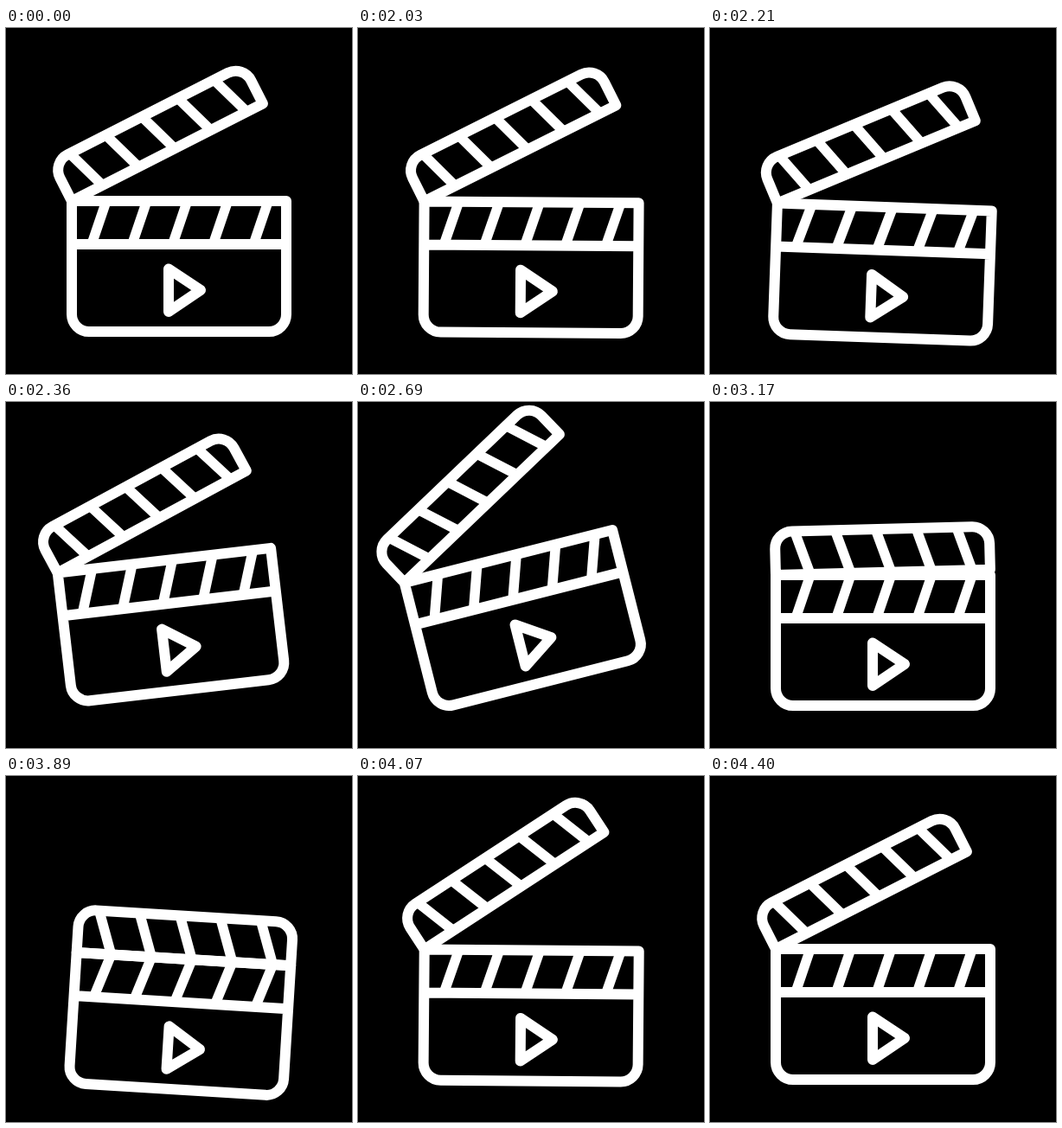
An HTML page that plays this animation: 400x400 px, repeating every 4430 ms.

```html
<!DOCTYPE html>
<html lang="en">
<head>
<meta charset="utf-8">
<title>Clapperboard</title>
<style>
  html, body { margin: 0; width: 100%; height: 100%; overflow: hidden; background: #000; }
  svg { display: block; width: 100%; height: 100%; }
  path { fill: none; stroke: #fff; stroke-width: 12; stroke-linejoin: round; }
  .stripes { stroke-width: 11.5; }
</style>
</head>
<body>
<svg viewBox="0 0 400 400">
  <g id="board">
    <path d="M76 200H324V331a20 20 0 0 1-20 20H96a20 20 0 0 1-20-20ZM76 250H324"/>
    <path d="M188 278.500V328L225 303Z"/>
    <path class="stripes" id="low"/>
    <g id="arm">
      <path d="M76 200V170a20 20 0 0 1 20-20H304a20 20 0 0 1 20 20V200Z"/>
      <path class="stripes" id="high"/>
    </g>
  </g>
</svg>
<script>
const LOOP = 4430;
const $ = id => document.getElementById(id);

// time, angle, shift x, shift y
const BOARD = [
  [2000, 0, 0, 0],
  [2150, 3.6, 0.8, 11.8],
  [2360, -6.6, -8.4, -17.2],
  [2630, -16.5, -8.8, -28.3],
  [2920, 3.5, 0.8, 10.5],
  [3095, 0, 0, 0],
  [3600, 0, 0, 0],
  [3870, 3.6, 0.8, 11.8],
  [4130, 0, 0, 0]
];

// time, angle relative to the board
const ARM = [
  [2080, -27],
  [2360, -21.8],
  [2630, -29.5],
  [2690, -29.5],
  [2900, 0],
  [2995, -4],
  [3090, 0],
  [3180, -1.5],
  [3325, 0],
  [3890, 0],
  [4105, -36],
  [4270, -25.6],
  [4400, -27]
];

// Slope at a key: flat at turning points and ends
function slope(keys, i, c) {
  const a = keys[i - 1], k = keys[i], b = keys[i + 1];
  if (!a || !b || (k[c] - a[c]) * (b[c] - k[c]) <= 0) return 0;
  return (b[c] - a[c]) / (b[0] - a[0]);
}

function sample(keys, c, t) {
  const last = keys.length - 1;
  if (t <= keys[0][0]) return keys[0][c];
  if (t >= keys[last][0]) return keys[last][c];
  const i = keys.findIndex(k => k[0] > t) - 1;
  const a = keys[i], b = keys[i + 1];
  const d = b[0] - a[0], s = (t - a[0]) / d, r = 1 - s;
  return a[c] * r * r * (1 + 2 * s) + b[c] * s * s * (3 - 2 * s)
    + d * s * r * (slope(keys, i, c) * r - slope(keys, i + 1, c) * s);
}

// Five slanted bars between the hinge line and the given edge
function stripes(edge) {
  let d = "";
  for (let i = 0; i < 5; i++) d += `M${116 + 46.8 * i} 200L${99 + 46.8 * i} ${edge}`;
  return d;
}

$("low").setAttribute("d", stripes(250));
$("high").setAttribute("d", stripes(150));

function draw(t) {
  const [turn, x, y] = [1, 2, 3].map(c => sample(BOARD, c, t));
  $("board").setAttribute("transform", `translate(${x} ${y}) rotate(${turn} 200 275)`);
  $("arm").setAttribute("transform", `rotate(${sample(ARM, 1, t)} 76 200)`);
}

const start = performance.now();
function tick(now) {
  draw(Math.max(0, now - start) % LOOP);
  requestAnimationFrame(tick);
}
draw(0);
requestAnimationFrame(tick);
</script>
</body>
</html>
```
